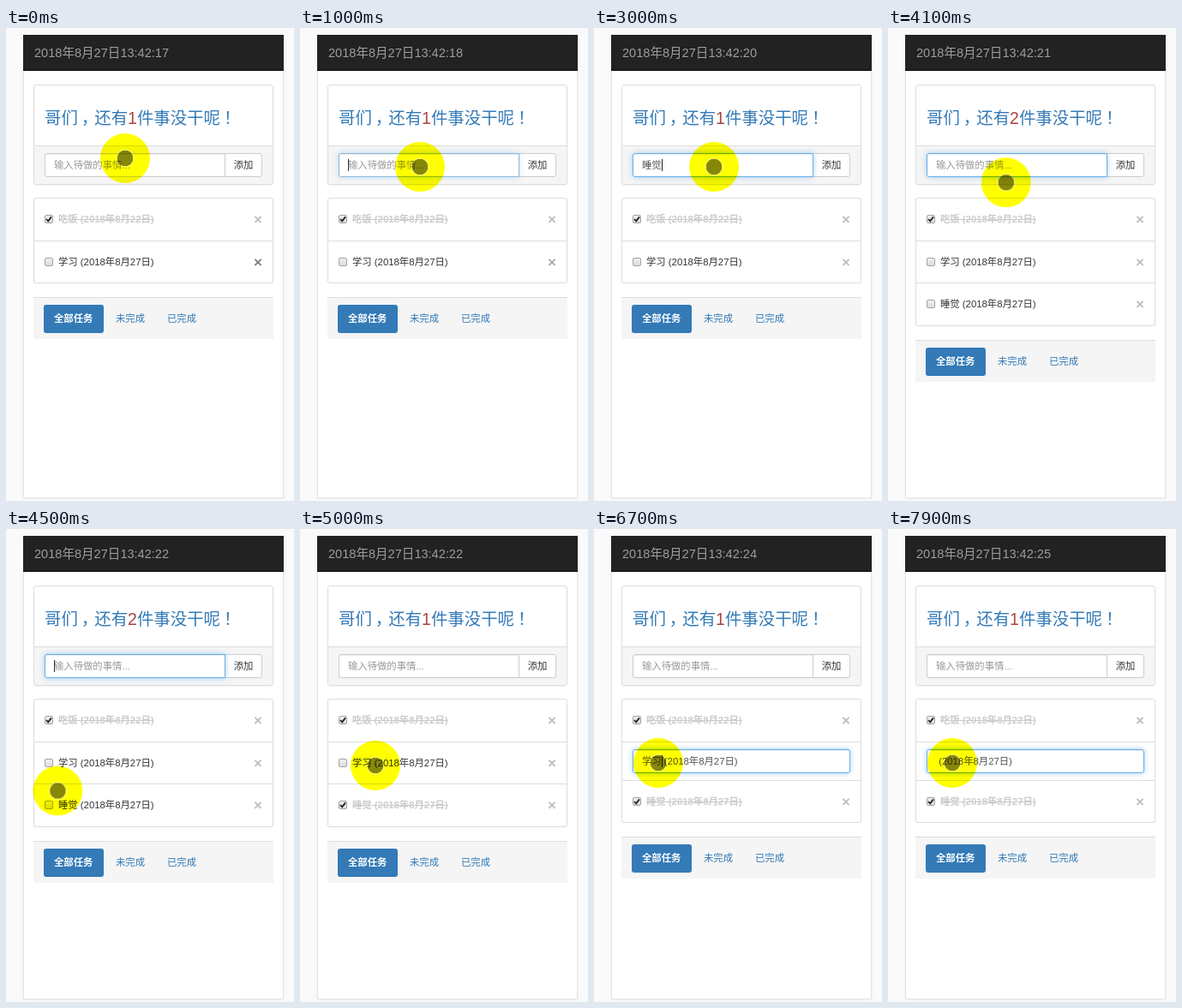
Animation of 336 by 552 pixels, one loop 8 s. Source, as an HTML page:

```html
<!DOCTYPE html>
<html lang="zh-CN">
<head>
<meta charset="utf-8">
<title>待办事项</title>
<style>
* { box-sizing: border-box; }
html, body { margin: 0; width: 100%; height: 100%; overflow: hidden; }
body {
  position: relative; background: #fafafa; color: #333;
  font: 11.35px/20px "Liberation Sans", "Noto Sans CJK SC", "Noto Sans CJK", sans-serif;
  white-space: nowrap;
}

.page, .nav, .panel, .list-area, .field, .add, .ime, .cursor, h1 { position: absolute; margin: 0; }
.page { left: 20px; top: 8px; width: 304px; height: 541px; background: #fff; border: 1px solid #e4e4e4; box-shadow: 0 0 4px rgba(0,0,0,.06); }
.nav { left: 20px; top: 8px; width: 304px; height: 42px; padding-left: 13px; background: #222; border-bottom: 1px solid #080808; color: #9d9d9d; font-size: 14.57px; line-height: 42px; }

.panel { left: 32px; top: 66px; width: 280px; height: 117px; border: 1px solid #ddd; border-radius: 3px; background: linear-gradient(#fff 70px, #ddd 70px 71px, #f5f5f5 71px); box-shadow: 0 1px 1px rgba(0,0,0,.05); }
h1 { left: 45px; top: 85px; font-size: 19.43px; line-height: 40px; font-weight: 400; color: #337ab7; }
h1 span { color: #a94442; }
h1 em { position: relative; left: .2em; font-style: normal; }

.add { left: 255px; top: 146px; width: 44px; height: 28px; line-height: 26px; text-align: center; background: #fff; border: 1px solid #ccc; border-radius: 0 3px 3px 0; }
.input { height: 28px; padding-left: 10px; line-height: 26px; white-space: pre; background: #fff; border: 1px solid #ccc; border-radius: 3px; color: #555; box-shadow: inset 0 1px 1px rgba(0,0,0,.075); }
.field { left: 45px; top: 146px; width: 211px; border-radius: 3px 0 0 3px; animation: focus 8s linear infinite; }
.field u { text-underline-offset: 2px; }
.hint { color: #999; }
.caret { display: inline-block; width: 1px; height: 14px; margin-right: -1px; vertical-align: -3px; background: #222; }

.list-area { left: 32px; top: 198.4px; width: 280px; }
.list { border: solid #ddd; border-width: 0 1px 1px; border-radius: 3px; }
.row { position: relative; height: 49.4px; border-top: 1px solid #ddd; line-height: 49px; padding-left: 28px; }
.row:first-child { border-radius: 3px 3px 0 0; }
.row i { position: absolute; left: 12px; top: 19px; width: 10px; height: 10px; border: 1px solid #a4a4a4; border-radius: 2px; background: linear-gradient(#eee, #ddd); }
.row svg { position: absolute; left: -1px; top: -1px; width: 10px; height: 10px; display: none; }
.row b { position: absolute; left: 251px; width: 20px; text-align: center; font-size: 17px; color: #000; opacity: .25; }
.row:nth-child(2) b { opacity: var(--mark); }
.done span { color: #ccc; font-weight: 700; text-decoration: line-through; }
.done svg { display: block; }
.edit { height: 45px; padding: 8px 12px 0; }
.edit .input { border-color: #66afe9; box-shadow: inset 0 1px 1px rgba(0,0,0,.075), 0 0 6px rgba(102,175,233,.6); }

.tabs { position: relative; height: 49px; margin-top: 16px; background: #f5f5f5; border-top: 1px solid #ddd; color: #337ab7; }
.tabs span { position: absolute; top: 8px; height: 33px; line-height: 33px; padding: 0 12px; border-radius: 3px; }
.tabs .on { background: #337ab7; color: #fff; width: 70px; font-weight: 700; }

.ime { left: 68px; top: 206px; width: 420px; height: 48px; display: flex; background: #fff; border: 2px solid #8c8c8c; border-width: 2px 1px; opacity: 0; animation: ime 8s linear infinite; }
.ime div { flex: none; padding: 0 15px; margin-right: 6px; font-size: 20px; line-height: 44px; color: #222; }
.ime small { display: inline-block; width: 12px; font-size: 17px; color: #888; }
.ime div:first-child, .ime div:first-child small { color: #fff; }
.ime div:first-child { background: #7a5cc0; }

.cursor { left: -29px; top: -29px; width: 58px; height: 58px; border-radius: 50%; background: radial-gradient(circle, #87870a 9px, #ffff60 9.6px 10.2px, #ff0 11px); mix-blend-mode: multiply; animation: move 8s linear infinite; }

@keyframes move {
  0% { transform: translate(139px, 152px); }
  5%, 8% { transform: translate(133px, 158px); }
  11.25%, 50% { transform: translate(140px, 162px); }
  51.25% { transform: translate(138px, 180px); }
  57%, 60% { transform: translate(49px, 324px); }
  61.25% { transform: translate(69px, 290px); }
  62.5% { transform: translate(88px, 276px); }
  70%, 100% { transform: translate(75px, 273px); }
}
@keyframes focus {
  0%, 11.25%, 60%, 100% { border-color: #ccc; box-shadow: inset 0 1px 1px rgba(0,0,0,.075), 0 0 6px rgba(102,175,233,0); }
  13.2%, 58% { border-color: #66afe9; box-shadow: inset 0 1px 1px rgba(0,0,0,.075), 0 0 6px rgba(102,175,233,.6); }
}
@keyframes ime {
  0%, 24.2% { opacity: 0; }
  25% { opacity: .62; }
  26.25%, 35.5% { opacity: 1; }
  36.8%, 100% { opacity: 0; }
}
</style>
</head>
<body>
<div class="page"></div>
<div class="nav" id="clock"></div>
<div class="panel"></div>
<h1>哥们<em>，</em>还有<span id="count">1</span>件事没干呢<em>！</em></h1>
<div class="add">添加</div>
<div class="field input" id="field"></div>
<div class="list-area">
  <div class="list" id="list"></div>
  <div class="tabs"><span class="on" style="left:12px">全部任务</span><span style="left:84px">未完成</span><span style="left:144px">已完成</span></div>
</div>
<div class="ime" id="ime"></div>
<div class="cursor"></div>
<script>
const LOOP = 8000;
const $ = id => document.getElementById(id);
const caret = on => on ? '<span class="caret"></span>' : '';
const blink = (t, start) => (t - start) % 1000 < 500;

// [start ms, value] pairs; the last one reached applies
const at = (steps, t) => steps.filter(s => s[0] <= t).pop()[1];

const typed = [[2000, 's'], [2100, 'sh'], [2200, 'shu'], [2300, 'shui'], [2500, "shui'j"],
  [2600, "shui'ji"], [2700, "shui'jia"], [2800, "shui'jiao"]];
const choices = [[0, '是 双 省 生'], [2100, '是 上 时 说'], [2200, '书 树 数 熟'],
  [2300, '水 睡 谁 税'], [2500, '睡觉 水晶 水井'], [2800, '睡觉 水饺 税']];
const edited = [[0, '学习'], [7000, '学'], [7300, '']];

function fieldHtml(t) {
  if (t >= 2000 && t < 2900) return `<u>${at(typed, t)}</u>${caret(true)}`;
  if (t >= 2900 && t < 3300) return '睡觉' + caret(true);
  const on = t >= 900 && t < 2000 ? blink(t, 900) : t >= 3300 && t < 4600 && blink(t, 3300);
  return caret(on) + '<span class="hint">输入待做的事情...</span>';
}

function row(name, day, done) {
  return `<div class="row${done ? ' done' : ''}"><i><svg viewBox="0 0 10 10"><path d="M2 5l2.2 2.3L8 2.4" fill="none" stroke="#222" stroke-width="1.8"/></svg></i><span>${name} (2018年8月${day}日)</span><b>×</b></div>`;
}

function editRow(t) {
  const on = t >= 7300 ? blink(t, 7300) : t >= 6300;
  return `<div class="row edit"><div class="input">${at(edited, t)}${caret(on)} (2018年8月27日)</div></div>`;
}

function listHtml(t) {
  return row('吃饭', 22, true)
    + (t < 6000 ? row('学习', 27, false) : editRow(t))
    + (t < 3300 ? '' : row('睡觉', 27, t >= 4600));
}

const imeHtml = t => at(choices, t).split(' ')
  .map((c, i) => `<div><small>${i + 1}</small>${c}</div>`).join('');

const shown = {};
function put(id, html) {
  if (shown[id] !== html) $(id).innerHTML = shown[id] = html;
}

function draw(t) {
  put('clock', '2018年8月27日13:42:' + (17 + Math.floor((t + 600) / 1000)));
  put('count', t >= 3300 && t < 4600 ? '2' : '1');
  put('field', fieldHtml(t));
  put('list', listHtml(t));
  put('ime', imeHtml(t));
  const fade = Math.min(1, Math.max(0, (t - 900) / 150));
  $('list').style.setProperty('--mark', 0.5 - 0.25 * fade);
}

let start;
function tick(now) {
  start ??= now;
  draw((now - start) % LOOP);
  requestAnimationFrame(tick);
}
draw(0);
requestAnimationFrame(tick);
</script>
</body>
</html>
```
